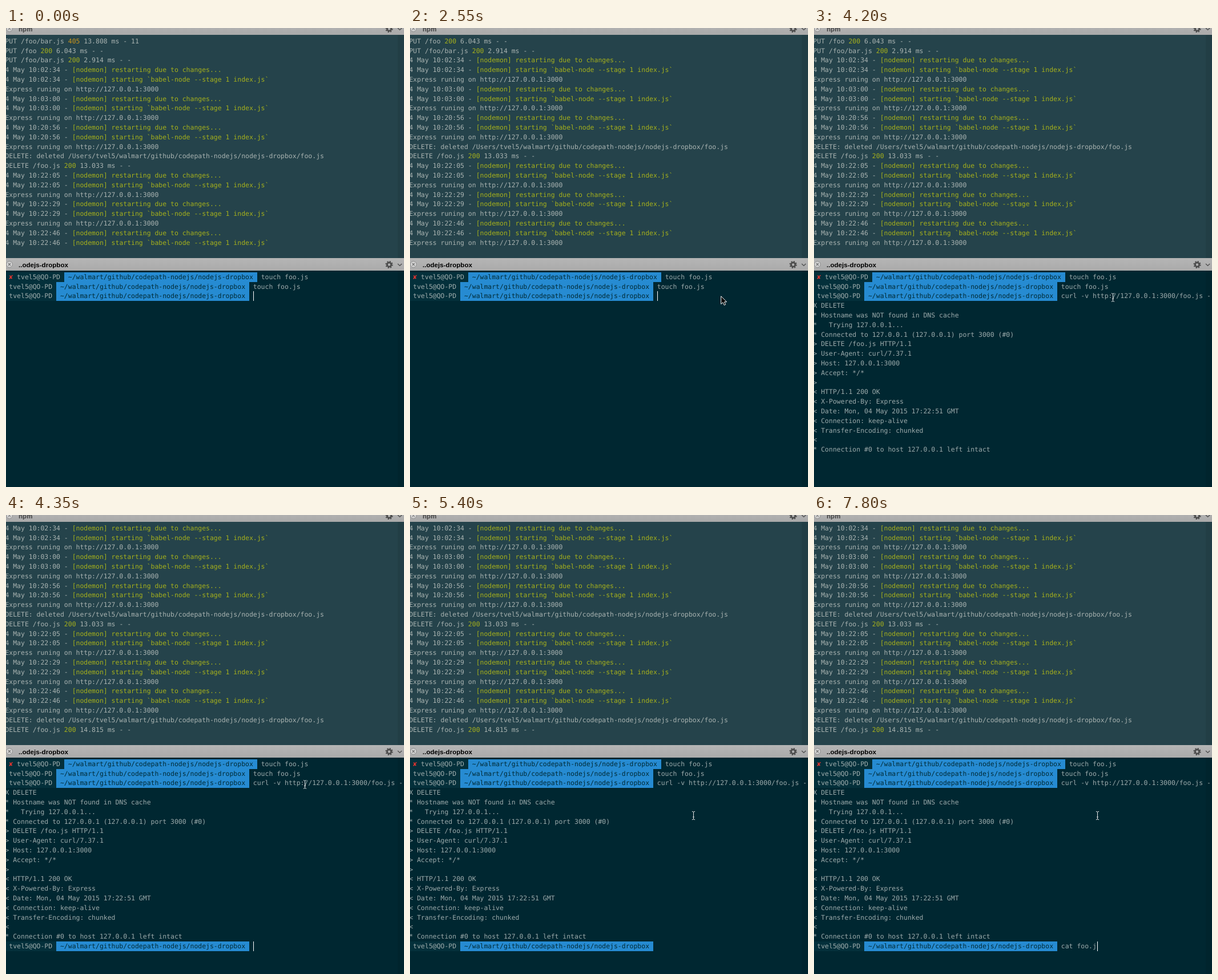
These frames come from a looping animation (697 by 804 pixels, 8 s). An HTML page:

```html
<!DOCTYPE html>
<html lang="en">
<head>
<meta charset="utf-8">
<title>Terminal panes</title>
<style>
  html, body { margin: 0; width: 100%; height: 100%; overflow: hidden; background: #002731; }
  #stage { position: relative; width: 697px; height: 804px; overflow: hidden; background: #002731; }
  #stage > * { position: absolute; }
  .term {
    font: 11.46px/16.8px "DejaVu Sans Mono", monospace;
    text-rendering: geometricPrecision;
    font-variant-ligatures: none;
    white-space: pre;
  }
  .row { height: 16.8px; }
  .row span { display: inline-block; height: 16.8px; }
  #top { left: 0; top: 0; width: 697px; height: 403px; background: #25434b; color: #a9b3b1; overflow: hidden; }
  #log { position: absolute; left: -1.6px; top: 14.8px; }
  #shell { left: -1.6px; top: 427.8px; color: #9caaab; }
  .ok { color: #a5b01c; }
  .warn { color: #c8941c; }
  .user { background: #04303b; color: #a0adad; }
  .path { background: #268bd2; color: #002b36; }
  .fail { color: #e5342f; font-weight: bold; }
  .bar { left: 0; width: 697px; height: 22px; background: linear-gradient(#b5b5b5, #aaa); }
  .bar b { position: absolute; left: 22px; top: 1px; font: bold 11.6px/21px "Liberation Sans", Arial, sans-serif; }
  .bar svg { position: absolute; left: 0; top: 1px; }
  .gutter { left: 686px; width: 11px; background: rgba(0, 0, 0, .08); }
  #caret { left: 0; top: 0; width: 1px; height: 17px; background: #fff; }
  #pointer { left: 0; top: 0; overflow: visible; }
</style>
</head>
<body>
<div id="stage">
  <div id="top" class="term"><div id="log"></div></div>
  <div class="gutter" style="top:12px;height:391px"></div>
  <div class="gutter" style="top:425px;height:379px"></div>
  <div id="shell" class="term"></div>
  <div class="bar" style="top:-10px;color:#444"><b>npm</b></div>
  <div class="bar" style="top:403px;color:#000"><b>..odejs-dropbox</b></div>
  <div id="caret"></div>
  <svg id="pointer" width="12" height="18">
    <path id="arrow" d="M.7.8V14.6L4 11.6 6.2 16.5 8.6 15.5 6.5 10.8H10.6Z" fill="#000" stroke="#fff"/>
    <path id="beam" d="M-2.6-7.2Q0-7.2 0-5.6Q0-7.2 2.6-7.2M0-5.6V5.6M-2.6 7.2Q0 7.2 0 5.6Q0 7.2 2.6 7.2M-1.4 2.5H1.4" fill="none" stroke="#e4e4e4"/>
  </svg>
</div>
<script>
const $ = id => document.getElementById(id);
const LOOP = 8000, CELL = 6.9, ROW = 16.8, LEFT = -1.6, SHELL_TOP = 427.8;
const CARET_INSET = 0.8;
const REPO = 'walmart/github/codepath-nodejs/nodejs-dropbox';

const span = (kind, text) => `<span class="${kind}">${text}</span>`;
const rows = list => list.map(line => `<div class="row">${line}</div>`).join('');
const escape = text => text.replace(/</g, '&lt;').replace(/>/g, '&gt;');

// Server log
const request = (what, code, ms, size = '-') =>
  `${what} ${span(code < 400 ? 'ok' : 'warn', code)} ${ms} ms - ${size}`;
const restart = time => [
  'restarting due to changes...',
  'starting `babel-node --stage 1 index.js`'
].map(text => `4 May ${time} - ${span('ok', '[nodemon] ' + text)}`)
 .concat('Express runing on http://127.0.0.1:3000');
const remove = ms => [
  `DELETE: deleted /Users/tvel5/${REPO}/foo.js`,
  request('DELETE /foo.js', 200, ms)
];
const log = [
  request('PUT /foo/bar.js', 405, '13.808', '11'),
  request('PUT /foo', 200, '6.043'),
  request('PUT /foo/bar.js', 200, '2.914'),
  ...['10:02:34', '10:03:00', '10:20:56'].flatMap(restart),
  ...remove('13.033'),
  ...['10:22:05', '10:22:29', '10:22:46'].flatMap(restart),
  ...remove('14.815')
];
const LOG_ROWS = 22;

// Shell session
const prompt = (command, mark = '') =>
  span('user', ` ${mark}tvel5@QO-PD `) + span('path', ` ~/${REPO} `) + ' ' + command;
const history = [
  prompt('touch foo.js', span('fail', '✘') + ' '),
  prompt('touch foo.js')
];
const curl = [prompt('curl -v http://127.0.0.1:3000/foo.js -'), 'X DELETE'];
const reply = `* Hostname was NOT found in DNS cache
*   Trying 127.0.0.1...
* Connected to 127.0.0.1 (127.0.0.1) port 3000 (#0)
> DELETE /foo.js HTTP/1.1
> User-Agent: curl/7.37.1
> Host: 127.0.0.1:3000
> Accept: */*
>
< HTTP/1.1 200 OK
< X-Powered-By: Express
< Date: Mon, 04 May 2015 17:22:51 GMT
< Connection: keep-alive
< Transfer-Encoding: chunked
<
* Connection #0 to host 127.0.0.1 left intact`.split('\n').map(escape);

const TYPED = 'cat foo.j';
const keyTimes = [5850, 6000, 6150, 6300, 6450, 6600, 6750, 7350, 7800];

// [start, value...] steps; the latest started one applies
const scrollSteps = [[0, 0], [600, 1], [4350, 3]];
const caretSteps = [[0, 63, 2], [3450], [3750, 8, 3], [4200], [4350, 63, 19], [5400], [5850, 63, 19]];
const pointerSteps = [
  [0], [2550, 'arrow', 544, 469], [2700, 'arrow', 523, 467],
  [3300, 'beam', 522.5, 478], [3750, 'beam', 523.5, 472], [4800, 'beam', 530.5, 470],
  [4950, 'beam', 501.5, 511], [5100, 'beam', 496.5, 526.5]
];
const at = (steps, t) => steps.filter(step => step[0] <= t).pop().slice(1);

function shellLines(t, typed) {
  if (t < 3750) return [...history, prompt('')];
  if (t < 4200) return [...history, ...curl];
  const lines = [...history, ...curl, ...reply];
  return t < 4350 ? lines : [...lines, prompt(TYPED.slice(0, typed))];
}

function setHtml(el, html) {
  if (el.shown !== html) el.innerHTML = el.shown = html;
}

function render(t) {
  const [first] = at(scrollSteps, t);
  const typed = keyTimes.filter(time => time <= t).length;
  setHtml($('log'), rows(log.slice(first, first + LOG_ROWS)));
  setHtml($('shell'), rows(shellLines(t, typed)));

  const [col, row] = at(caretSteps, t);
  $('caret').style.display = col === undefined ? 'none' : 'block';
  if (col !== undefined) {
    const x = Math.floor(LEFT + CARET_INSET + (col + typed) * CELL);
    const y = Math.round(SHELL_TOP + row * ROW);
    $('caret').style.transform = `translate(${x}px, ${y}px)`;
  }

  const [shape, x = 0, y = 0] = at(pointerSteps, t);
  $('pointer').style.transform = `translate(${x}px, ${y}px)`;
  for (const id of ['arrow', 'beam']) $(id).style.display = id === shape ? 'inline' : 'none';
}

for (const bar of document.querySelectorAll('.bar')) {
  bar.insertAdjacentHTML('beforeend', `<svg width="697" height="21" fill="none">
    <circle cx="6" cy="10" r="5.3" fill="#d6d6d6" stroke="#8d8d8d"/>
    <path d="M3.8 7.8l4.4 4.4m0-4.4l-4.4 4.4" stroke="#777" stroke-width="1.3"/>
    <g stroke="#4c4c4c">
      <circle cx="671" cy="10.5" r="3.6" stroke-width="2.8"/>
      <circle cx="671" cy="10.5" r="5.6" stroke-width="2" stroke-dasharray="2.2 2.198"/>
      <path d="M686 9l3.6 3.4L693.2 9" stroke-width="1.3"/>
    </g></svg>`);
}

const start = performance.now();
function tick() {
  render((performance.now() - start) % LOOP);
  requestAnimationFrame(tick);
}
tick();
</script>
</body>
</html>
```
